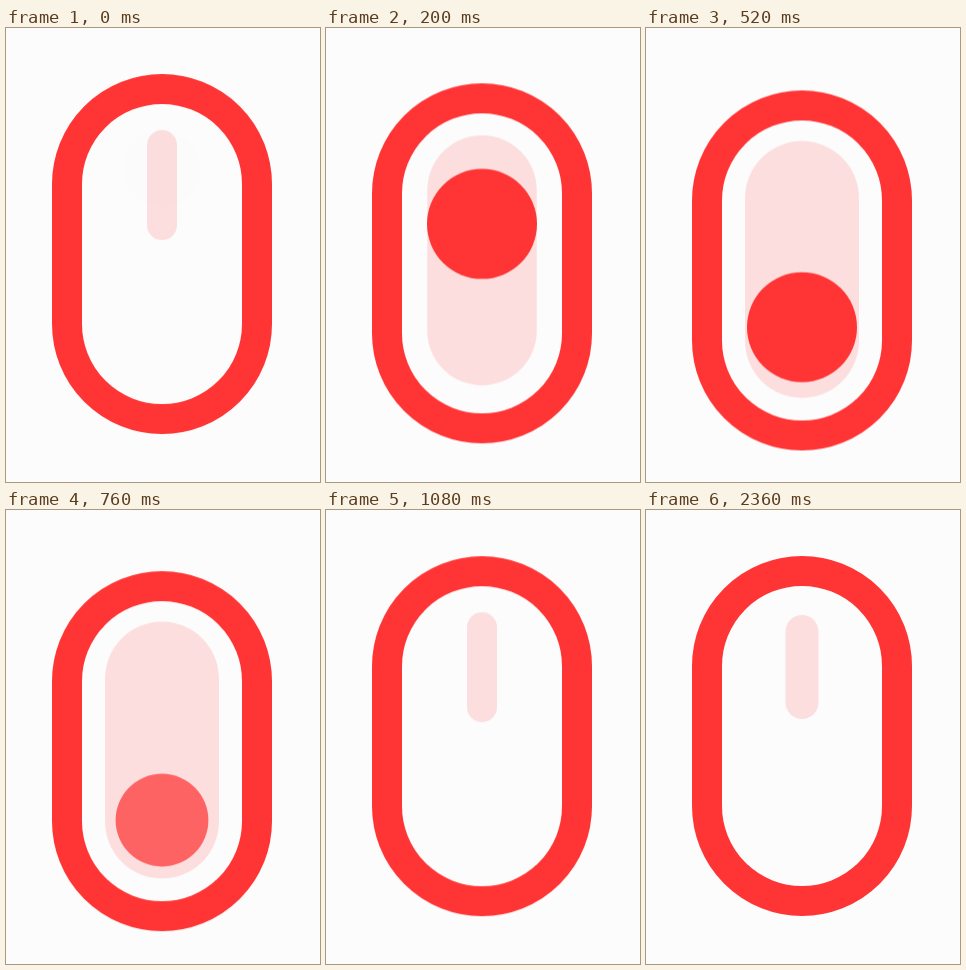
An HTML page for the animation above (2480 ms loop, 314x454 px).

```html
<!DOCTYPE html>
<html lang="en">
<head>
<meta charset="utf-8">
<title>Scroll mouse</title>
<style>
  :root {
    --red: #ff3535;
    --loop: 2480ms;
    --swift: cubic-bezier(.4, 0, .2, 1);
  }
  html, body {
    margin: 0;
    width: 100%;
    height: 100%;
    overflow: hidden;
    background: #fcfcfc;
  }
  svg { display: block; width: 314px; height: 454px; }

  .mouse { animation: bob var(--loop) infinite; }
  .body { fill: none; stroke: var(--red); stroke-width: 30; }
  .wheel { fill: var(--red); fill-opacity: .15; animation: wheel var(--loop) infinite; }
  .ball {
    fill: var(--red);
    animation: roll var(--loop) infinite, fade var(--loop) linear infinite;
  }

  @keyframes bob {
    0% { transform: translateY(0); animation-timing-function: var(--swift); }
    25%, 29.03% { transform: translateY(16.7px); animation-timing-function: var(--swift); }
    45.97%, 100% { transform: translateY(0); }
  }

  /* Snap open, settle, close, then relax slightly until the loop restarts */
  @keyframes wheel {
    0% {
      x: 141px; y: 102px; width: 30px; height: 110px; rx: 15px;
      animation-timing-function: cubic-bezier(.3, 0, .6, 1);
    }
    4.84% {
      x: 103px; y: 98px; width: 106px; height: 246px; rx: 53px;
      animation-timing-function: ease-out;
    }
    12.9% {
      x: 100px; y: 98px; width: 112px; height: 253px; rx: 56px;
      animation-timing-function: ease-out;
    }
    22.58%, 30.65% {
      x: 99px; y: 96.5px; width: 114px; height: 257px; rx: 57px;
      animation-timing-function: var(--swift);
    }
    41.94%, 45.16% {
      x: 141px; y: 102px; width: 30px; height: 110px; rx: 15px;
      animation-timing-function: ease-in-out;
    }
    61.29%, 100% { x: 139.5px; y: 105px; width: 33px; height: 104px; rx: 16.5px; }
  }

  @keyframes roll {
    0%, 2.42% { cy: 140.5px; animation-timing-function: var(--swift); }
    30.65%, 100% { cy: 295px; }
  }

  @keyframes fade {
    0% { opacity: 0; r: 38.5px; }
    5.65%, 27.82% { opacity: 1; r: 55px; }
    38.31%, 100% { opacity: 0; r: 23.5px; }
  }
</style>
</head>
<body>
<svg viewBox="0 0 314 454">
  <g class="mouse">
    <rect class="body" x="61" y="61" width="190" height="330" rx="95"/>
    <rect class="wheel" x="141" y="102" width="30" height="110" rx="15"/>
    <circle class="ball" cx="156" cy="140.5" r="55"/>
  </g>
</svg>
</body>
</html>
```
